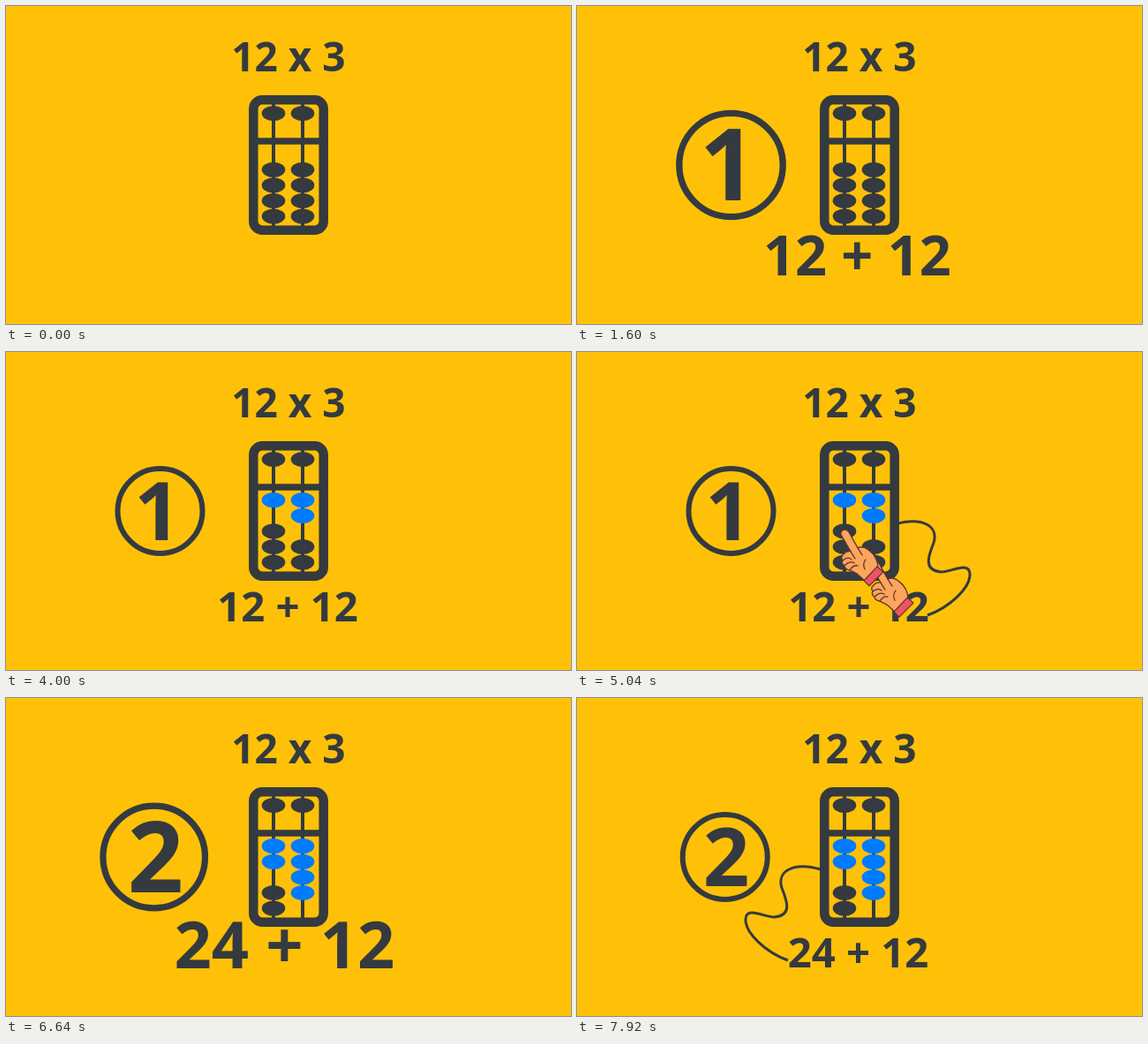
An HTML page for the animation above (8 s loop, 640 px wide and 360 px high).

```html
<!DOCTYPE html>
<html lang="en">
<head>
<meta charset="utf-8">
<title>Abacus multiplication</title>
<style>
  html, body { margin: 0; width: 100%; height: 100%; overflow: hidden; background: #ffc107; }
  svg { display: block; width: 100vw; height: 100vh; }
  text { font: bold 47.3px "Open Sans", "Noto Sans", sans-serif; text-anchor: middle; fill: #343a40; }
  .digit { font-size: 92px; }
  .ink { fill: none; stroke: #343a40; }
</style>
</head>
<body>
<svg viewBox="0 0 640 360">
  <defs>
    <path id="wire" class="ink" stroke-width="3" pathLength="100"
      d="M239 297C214 288 190 266 191 250C192 235 214 249 224 248C244 246 238 230 232 215C226 196 245 185 276 194"/>
    <g id="hand" stroke="#5f3530" stroke-width="1.3" stroke-linejoin="round" stroke-linecap="round">
      <path fill="#fca55d" d="M-4 2C-5 -4 2 -6 5 -1L15 17Q21 14 27 19C34 24 38 31 38 40L24 55L14 46L6 42Q0 41 0 37Q-4 35 -2 31Q-5 27 -1 24Q2 20 7 21Z"/>
      <path fill="none" d="M7 21L12 29M-2 31Q4 26 8 30M0 37Q6 31 11 34M6 42Q10 36 15 37M15 17L20 25M24 30Q20 35 23 41"/>
      <path fill="#ef5364" d="M22 54L37 38L44 44L28 60Z"/>
    </g>
  </defs>

  <text x="320" y="74" style="font-size:46px">12 x 3</text>

  <use id="wireLeft" href="#wire"/>
  <g transform="matrix(-1 0 0 1 636 1)"><use id="wireRight" href="#wire"/></g>

  <path class="ink" stroke-width="4" d="M303 108V252M336 108V252"/>
  <path class="ink" stroke-width="7.5" d="M280 153H360"/>
  <rect class="ink" stroke-width="10.5" x="280.3" y="106.3" width="79.4" height="147.4" rx="10"/>
  <g id="beads"></g>

  <g id="badge1">
    <circle class="ink" stroke-width="6" cx="174.5" cy="180" r="48"/>
    <text class="digit" x="171.5" y="213">1</text>
  </g>
  <g id="badge2">
    <circle class="ink" stroke-width="6" cx="167.7" cy="180" r="48"/>
    <text class="digit" x="169" y="213">2</text>
  </g>
  <text id="sum1" x="319" y="305">12 + 12</text>
  <text id="sum2" x="318.5" y="305">24 + 12</text>

  <use id="hand2" href="#hand"/>
  <use id="hand1" href="#hand"/>
</svg>
<script>
  const LOOP = 8000, STEP = 17.6;
  const $ = id => document.getElementById(id);
  const ramp = (t, a, b) => Math.min(1, Math.max(0, (t - a) / (b - a)));
  const beadY = row => 185.3 + STEP * row;

  function addBead(x, y) {
    const el = document.createElementNS("http://www.w3.org/2000/svg", "ellipse");
    const set = { cx: x, cy: y, rx: 13.3, ry: 8.6, fill: "#343a40" };
    for (const key in set) el.setAttribute(key, set[key]);
    $("beads").append(el);
    return el;
  }

  // The first push lifts 1 and 2 beads, the second the next 1 and 2.
  const beads = [];
  [303, 336].forEach((x, col) => {
    addBead(x, 121.5);
    for (let row = 0; row < 4; row++) {
      beads.push({ el: addBead(x, beadY(row)), row, push: Math.floor(row / (col + 1)) });
    }
  });

  function blue(p) {
    const mix = (a, b) => Math.round(a + (b - a) * p);
    return `rgb(${mix(52, 0)},${mix(58, 123)},${mix(64, 255)})`;
  }

  function pop(id, x, y, scale, alpha) {
    $(id).setAttribute("transform", `translate(${x} ${y}) scale(${scale}) translate(${-x} ${-y})`);
    $(id).setAttribute("opacity", alpha);
  }

  function trim(id, from, to) {
    const el = $(id);
    el.style.display = to > from ? "" : "none";
    el.setAttribute("stroke-dasharray", `0 ${from * 100} ${(to - from) * 100} 200`);
  }

  function placeHand(id, x, row, p, alpha) {
    $(id).setAttribute("transform", `translate(${x} ${beadY(row) + 2 - STEP * p})`);
    $(id).setAttribute("opacity", alpha);
  }

  function draw(t) {
    const gone = 1 - ramp(t, 6340, 6560);
    pop("badge1", 174.5, 180, 1 + .57 * (1 - ramp(t, 1400, 1730)), ramp(t, 1400, 1520) * gone);
    pop("sum1", 324, 304, 1 + .92 * (1 - ramp(t, 1280, 1760)) ** .92, ramp(t, 1240, 1480) * gone);
    pop("badge2", 167.7, 180, 1 + .42 * (1 - ramp(t, 6520, 6755)), ramp(t, 6500, 6620));
    pop("sum2", 324, 304, 1 + .77 * (1 - ramp(t, 6525, 6960)), ramp(t, 6500, 6620));

    const push = [ramp(t, 3120, 3520), ramp(t, 5120, 5520)];
    trim("wireLeft", t < 7000 ? push[0] : 0, t < 7000 ? ramp(t, 2490, 2920) : ramp(t, 7490, 7920));
    trim("wireRight", push[1], ramp(t, 4090, 4520));

    for (const { el, row, push: i } of beads) {
      const p = push[i] || 0;
      el.setAttribute("cy", beadY(row) - STEP * p);
      el.setAttribute("fill", blue(p));
    }

    const n = t < 4300 ? 0 : 1, local = t - 2000 * n;
    const alpha = ramp(local, 2680, 3040) * (1 - ramp(local, 3560, 3980));
    placeHand("hand1", 303, n, push[n], alpha);
    placeHand("hand2", 337, 1 + 2 * n, push[n], alpha);
  }

  function frame() {
    draw(performance.now() % LOOP);
    requestAnimationFrame(frame);
  }
  frame();
</script>
</body>
</html>
```
